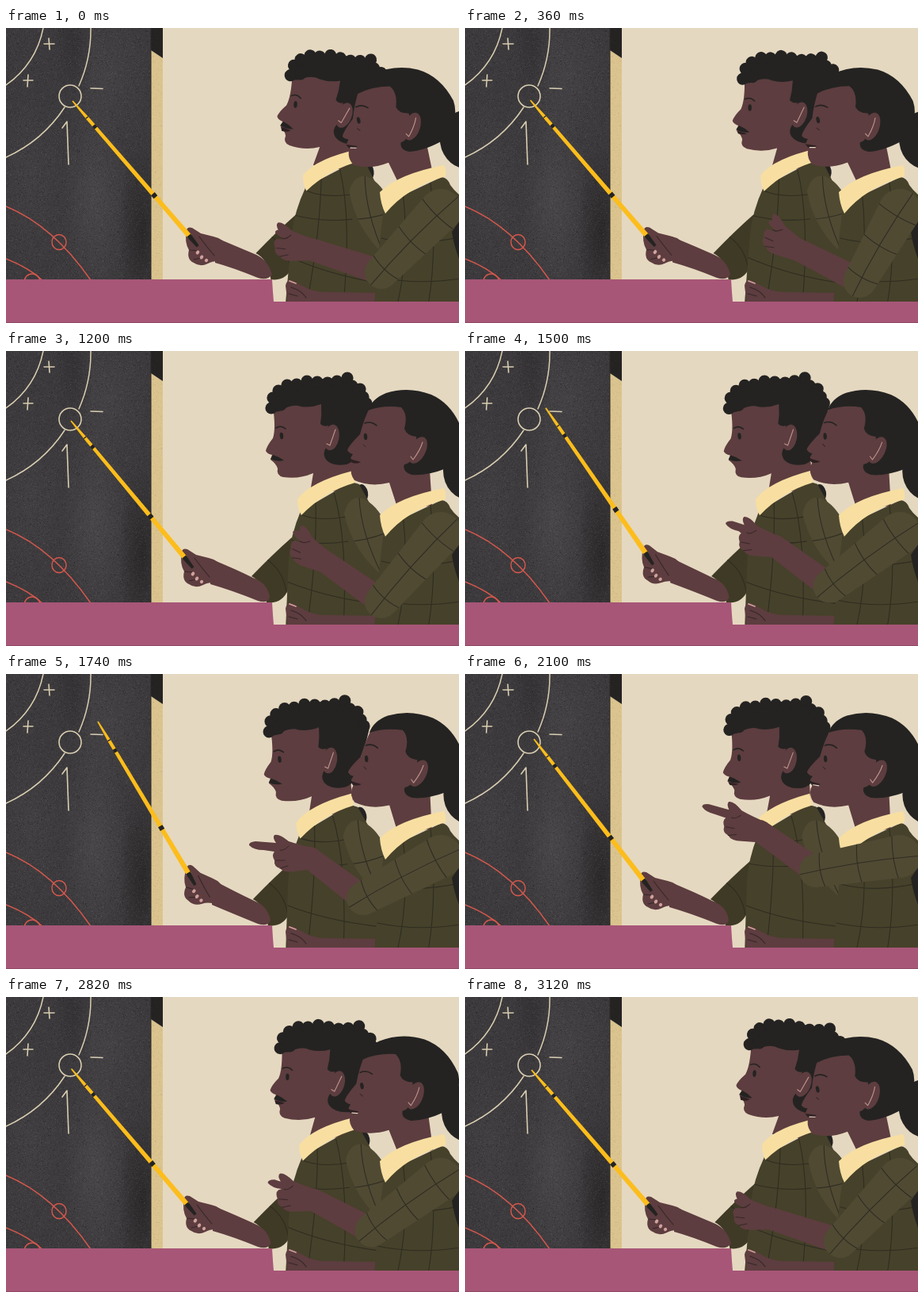
Animation, 572 px wide and 372 px high, one loop 3180 ms. Source, as an HTML page with a canvas:

```html
<!DOCTYPE html>
<html lang="en">
<head>
<meta charset="utf-8">
<title>At the chalkboard</title>
<style>
html, body { margin: 0; width: 100%; height: 100%; overflow: hidden; background: #e5d8c0; }
canvas { display: block; }
</style>
</head>
<body>
<canvas id="stage" width="572" height="372"></canvas>
<script>
const W = 572, H = 372, LOOP = 3180, STEP = 60;
const ctx = document.getElementById('stage').getContext('2d');
const C = {
  wall: '#e5d8c0', board: '#3c3a3c', frame: '#dbc48e', desk: '#a75677',
  skin: '#5d3d3f', hair: '#242322', olive: '#46412a', sleeve: '#504a33',
  far: '#3f3a25', cream: '#f8dfa1', gold: '#fcbd1c', chalk: '#d9ceb2',
  red: '#d4574d', plaid: '#2f2c22', pink: '#bd9491', nail: '#d0a19c'
};

// Pose columns, then one row per key time.
const COLS = ['t', 'lean', 'nod', 'talk', 'hx', 'hy', 'hr', 'tx', 'ty',
  'wr', 'ex', 'ey', 'wx', 'wy', 'wa', 'point'];
const KEYS = [
  [0, 2.6, 8, 1, 6, 2, 0, 84, 92, -8, 474, 308, 385, 279, 6, 0],
  [720, 1.3, 1, .1, 2, 1, 0, 81, 90, -7, 523, 330, 454, 279, 42, 0],
  [1200, 0, 0, 0, 0, 0, 0, 82, 88, 0, 474, 316, 402, 265, 25, .15],
  [1740, -.6, 0, 0, 2, -3, 10, 116, 60, 1, 451, 283, 384, 232, 0, 1],
  [2100, -.8, 2, .6, 0, 0, 0, 87, 82, 1, 443, 248, 372, 198, 11, 1],
  [2520, -1, 2.5, .8, 0, 0, 0, 81, 89, 0, 449, 281, 391, 232, 4, .8],
  [3120, 2.6, 8, 1, 6, 2, 0, 84, 92, -8, 474, 308, 385, 279, 6, 0]
];

function pose(t) {
  let i = 0;
  while (i < KEYS.length - 2 && t >= KEYS[i + 1][0]) i++;
  const a = KEYS[i], b = KEYS[i + 1];
  let u = Math.min(1, (t - a[0]) / (b[0] - a[0]));
  u = u * u * (3 - 2 * u);
  const p = {};
  COLS.forEach((name, n) => { p[name] = a[n] + (b[n] - a[n]) * u; });
  return p;
}

const rad = d => d * Math.PI / 180;

function fill(d, color, g = ctx) {
  g.fillStyle = color;
  g.fill(typeof d === 'string' ? new Path2D(d) : d);
}

function line(d, color, width = 1.2, g = ctx) {
  g.strokeStyle = color;
  g.lineWidth = width;
  g.lineCap = g.lineJoin = 'round';
  g.stroke(new Path2D(d));
}

function oval(x, y, rx, ry, rot, color) {
  ctx.fillStyle = color;
  ctx.beginPath();
  ctx.ellipse(x, y, rx, ry, rot, 0, 7);
  ctx.fill();
}

function group(draw) {
  ctx.save();
  draw();
  ctx.restore();
}

function turn(deg, x, y) {
  ctx.translate(x, y);
  ctx.rotate(rad(deg));
  ctx.translate(-x, -y);
}

// Outline around two circles.
function limb(x1, y1, r1, x2, y2, r2) {
  const a = Math.atan2(y2 - y1, x2 - x1);
  const b = Math.acos((r1 - r2) / Math.hypot(x2 - x1, y2 - y1));
  const path = new Path2D();
  path.arc(x1, y1, r1, a + b, a - b + 2 * Math.PI);
  path.arc(x2, y2, r2, a - b, a + b);
  path.closePath();
  return path;
}

function cloth(shape, color, lines) {
  const path = new Path2D(shape);
  fill(path, color);
  group(() => {
    ctx.clip(path);
    line(lines, C.plaid, 1.1);
  });
}

function random(seed) {
  return () => (seed = (seed * 16807) % 2147483647) / 2147483647;
}

function makeRoom() {
  const room = document.createElement('canvas');
  room.width = W;
  room.height = H;
  const g = room.getContext('2d'), rnd = random(71);
  g.fillStyle = C.wall;
  g.fillRect(0, 0, W, H);
  g.fillStyle = C.board;
  g.fillRect(0, 0, 183, 318);

  const glow = (x, y, rx, ry, color) => {
    g.save();
    g.beginPath();
    g.rect(0, 0, 183, 318);
    g.clip();
    g.translate(x, y);
    g.scale(rx, ry);
    const soft = g.createRadialGradient(0, 0, 0, 0, 0, 1);
    soft.addColorStop(0, `rgba(${color},.6)`);
    soft.addColorStop(1, `rgba(${color},0)`);
    g.fillStyle = soft;
    g.fillRect(-1, -1, 2, 2);
    g.restore();
  };
  glow(112, 215, 42, 130, '82,79,84');
  glow(125, 60, 55, 100, '74,71,75');
  glow(30, 190, 45, 110, '68,66,69');
  glow(172, 260, 30, 120, '32,29,30');
  glow(85, 25, 25, 80, '46,44,46');

  fill('M183 28L198 38V318H183Z', C.frame, g);
  fill('M183 0H198V38L183 28Z', '#252322', g);
  for (let i = 0; i < 15000; i++) {
    const x = rnd() * 197, y = rnd() * 317;
    const light = rnd() > .5;
    const alpha = x < 183 ? .11 : .03;
    g.fillStyle = light ? `rgba(150,146,150,${alpha})` : `rgba(12,10,12,${alpha * 1.5})`;
    g.fillRect(x | 0, y | 0, 1, 1);
  }
  line('M183 0V317', '#2b2928', 1, g);

  line('M107 0A174 174 0 0 1 92 73M74 100A174 174 0 0 1 0 163M47 0Q38 45 0 72', C.chalk, 1.5, g);
  line('M95 86A14 14 0 1 1 67 86A14 14 0 1 1 95 86', C.chalk, 1.6, g);
  line('M48 20H61M54 13L55 27M22 66H34M28 59L27 74M107 76L122 76.5', C.chalk, 1.6, g);
  line('M79 172L77 118L71 126', C.chalk, 1.6, g);
  line('M0 225Q59 249 107 318M0 291Q28 302 46 318', C.red, 1.5, g);
  line('M76 270A9 9.5 0 1 1 58 270A9 9.5 0 1 1 76 270M23 320A10 10 0 0 1 43 320', C.red, 1.5, g);
  return room;
}

const CURLS = [[335, 72], [337, 59], [344, 50], [355, 43], [367, 42], [380, 38], [393, 39],
  [406, 40], [418, 38], [431, 34], [437, 44], [447, 48], [451, 58], [455, 66], [347, 68]];

function manHead(p) {
  turn(p.nod, 410, 148);
  fill('M337 70Q341 98 337 110Q329 120 328 126Q330 130 336 131L334 137Q341 142 343 148' +
    'Q341 157 350 159Q370 162 388 154L384 178L441 176L436 120L420 60L350 60Z', C.skin);
  fill('M333 78L345 76Q362 66 372 70Q385 72 398 67Q399 80 397 92Q401 96 407 94Q403 110 404 122' +
    'Q399 130 404 137Q412 146 430 143Q446 138 446 115Q456 95 462 68L450 48L430 34L380 36L350 44L336 58Z', C.hair);
  CURLS.forEach(([x, y]) => oval(x, y, 7.6, 7.6, 0, C.hair));
  oval(411, 109, 9.5, 16.5, .18, C.skin);
  line('M416 99L409 119L405 117', C.pink, 1.1);
  oval(348, 107, 2.2, 4.2, -.1, C.hair);
  line('M341 97Q347 93 353 98', C.hair, 1.6);
  fill('M334 136L337 131Q344 133 351 138Q341 140 334 136Z', C.hair);
  if (p.talk > .05) {
    fill(`M335 138L348 140Q344 ${140 + 4 * p.talk} 337 ${139 + 4 * p.talk}Z`, '#2d2022');
  }
}

function pointerArm(p) {
  const dx = p.hx, dy = p.hy;
  group(() => {
    ctx.translate(dx * .9, 0);
    cloth('M361 235Q337 256 310 284Q326 292 329 317Q348 320 357 300L370 250Z', C.far,
      'M328 262Q350 276 354 304');
  });
  fill(`M${258 + dx} ${262 + dy}Q290 275 ${312 + dx * .7} 286Q331 293 ${333 + dx * .5} 311` +
    `Q330 319 318 315Q286 302 ${258 + dx} ${294 + dy}Z`, C.skin);
  group(() => {
    ctx.translate(dx, dy);
    turn(p.hr, 260, 275);
    fill('M222 253Q223 248 229 250L240 257L256 261Q270 264 273 275L262 292Q254 292 249 295' +
      'Q239 300 231 294Q222 290 225 278Q219 268 222 253Z', C.skin);
    line('M238 261Q246 272 257 285M226 278L237 279M231 290L240 288', '#35272a', 1.1);
    oval(236, 281, 2, 2.7, .5, C.nail);
    oval(241, 287, 2, 2.7, .6, C.nail);
    oval(247, 291, 2, 2.3, .8, C.nail);
  });
  const c = Math.cos(rad(p.hr)), s = Math.sin(rad(p.hr));
  const bx = 260 - 34 * c + 14 * s + dx, by = 275 - 34 * s - 14 * c + dy;
  group(() => {
    ctx.translate(p.tx, p.ty);
    ctx.rotate(Math.atan2(by - p.ty, bx - p.tx));
    const len = Math.hypot(bx - p.tx, by - p.ty);
    fill(`M0 -.8L${len * .13} -2.1L${len} -3.2V3.2L${len * .13} 2.1L0 .8Z`, C.gold);
    ctx.fillStyle = C.hair;
    ctx.fillRect(len * .12, -2, 1.3, 4);
    ctx.fillRect(len * .18, -2.4, 4.5, 4.8);
    ctx.fillRect(len * .685, -3.1, 5.5, 6.2);
    fill(`M${len - 2} -3.2L${len + 16} -1.5V2L${len - 2} 3.2Z`, C.hair);
  });
}

function man(p) {
  group(() => {
    turn(p.lean, 410, 345);
    manHead(p);
  });
  pointerArm(p);
  group(() => {
    turn(p.lean, 410, 345);
    oval(450, 179, 7, 11, -.2, C.hair);
    cloth('M372 202Q359 233 357 262L353 352H480V230L446 168L436 165Z', C.olive,
      'M358 238Q395 246 432 240M355 291Q405 311 470 319M374 207Q396 215 430 209' +
      'M391 188Q393 255 380 350M414 178Q432 240 426 350');
    fill('M368 187Q384 165 438 151L441 166Q402 177 373 207Q368 199 368 187Z', C.cream);
    cloth('M427 205Q432 184 447 185Q464 190 476 211L481 288Q438 255 427 205Z', C.sleeve,
      'M427 240Q450 241 484 228M446 185Q448 230 476 285');
  });
  fill('M353 325Q354 317 361 318L380 328Q390 333 405 333L468 334V350H356Z', C.skin);
  line('M358 319L366 322', C.nail, 1.8);
  line('M360 327Q373 331 379 340M357 335L368 338', '#35272a', 1.2);
}

function womanHead(p) {
  turn(p.wr, 510, 175);
  oval(586, 151, 34, 37, 0, C.hair);
  fill('M461 68Q452 85 447 105Q433 119 431 125Q433 129 438 130L435 135Q440 140 436 146' +
    'Q434 155 440 163Q460 172 484 166L495 200L538 195L535 150L520 65Z', C.skin);
  // The cheek runs straight into the ear; the hair wraps above and behind it.
  fill('M457 75Q462 60 480 53Q508 44 537 55Q564 67 576 100Q581 125 556 148Q530 158 512 156' +
    'Q500 152 503 143Q512 142 519 125L518 108Q506 107 503 98Q508 80 499 71Q476 68 457 75Z', C.hair);
  oval(520, 125, 10, 18, .45, C.skin);
  line('M526 115Q523 125 514 137L511 133', C.pink, 1.1);
  oval(454, 108, 2.2, 4.2, -.1, C.hair);
  line('M453 91Q461 88 468 94', C.hair, 1.6);
  line('M451 118L454 121', '#392629', 1);
  fill('M434 136L448 140Q444 143 437 141Z', '#2d2022');
  if (p.talk > .3) line('M439 141L446 142', '#ead9c9', 1.2);
}

function womanArm(p) {
  const { ex, ey, wx, wy, point } = p;
  const a = Math.atan2(wy - ey, wx - ex);
  fill(limb(ex + 9 * Math.cos(a), ey + 9 * Math.sin(a), 16, wx, wy, 14), C.skin);
  group(() => {
    ctx.translate(wx, wy);
    ctx.rotate(rad(p.wa));
    const tip = -47 - 30 * point;
    fill('M8 -12Q-12 -16 -27 -21Q-39 -31 -45 -29Q-48 -26 -43 -19' +
      `L${tip + 8} -21Q${tip - 1} -20 ${tip} -16Q${tip + 6} -10 ${tip + 18} -10L-45 -8` +
      'Q-49 -4 -45 3Q-46 11 -38 13Q-33 19 -20 17L4 14Z', C.skin);
    line('M-27 -15Q-34 -8 -38 -10M-43 3L-32 3M-38 13L-28 10', '#38272a', 1);
  });
  const sx = 549, sy = 230, len = Math.hypot(ex - sx, ey - sy);
  const path = limb(sx, sy, 27, ex, ey, 21);
  fill(path, C.sleeve);
  group(() => {
    ctx.clip(path);
    ctx.translate(sx, sy);
    ctx.rotate(Math.atan2(ey - sy, ex - sx));
    line(`M-30 -4Q${len / 2} 4 ${len + 30} -2M5 -35Q12 0 4 35` +
      `M${len * .48} -30Q${len * .54} 0 ${len * .46} 30M${len * .9} -30Q${len} 0 ${len * .9} 30`, C.plaid, 1.1);
  });
}

function woman(p) {
  group(() => womanHead(p));
  cloth('M478 222Q470 275 465 352H580V216Q567 207 561 198Q558 189 550 188Z', C.olive,
    'M474 265Q520 277 580 262M469 314Q520 325 580 315M501 205Q510 280 494 350M536 195Q545 280 533 350');
  fill('M580 232L563 257Q566 280 580 310Z', C.hair);
  fill('M472 207Q495 184 553 173Q556 179 555 187Q506 201 479 234Q473 222 472 207Z', C.cream);
  womanArm(p);
}

function desk() {
  fill('M0 317H336L337 333L338 345H572V372H0Z', C.desk);
  ctx.fillStyle = '#8f4a66';
  ctx.fillRect(0, 371, W, 1);
}

const room = makeRoom();

function frame(now) {
  const p = pose(Math.floor((now % LOOP) / STEP) * STEP);
  ctx.drawImage(room, 0, 0);
  man(p);
  woman(p);
  desk();
}

const start = performance.now();
function tick() {
  frame(performance.now() - start);
  requestAnimationFrame(tick);
}
tick();
</script>
</body>
</html>
```
